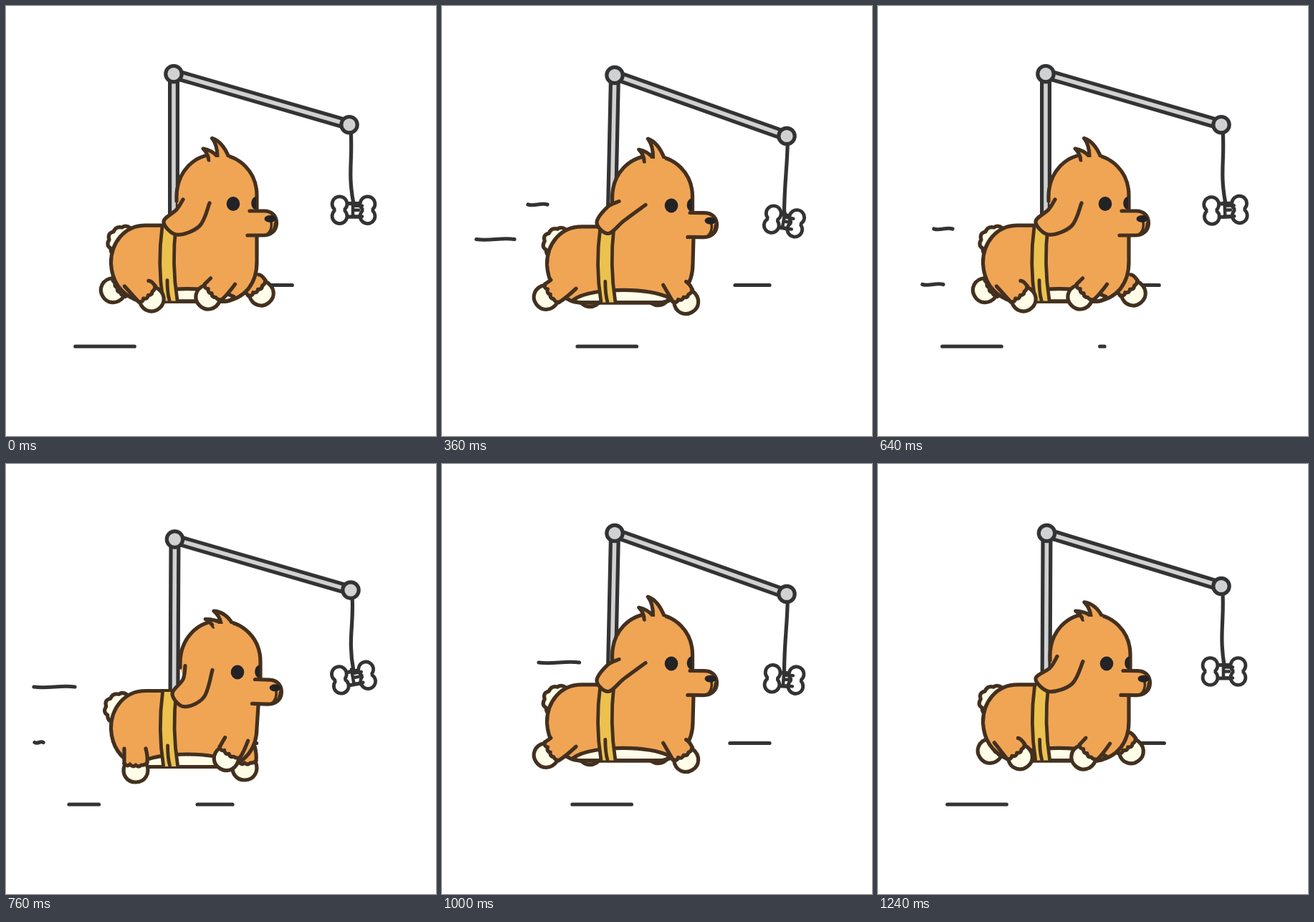
An HTML page for the animation above (1280 ms loop, 600x600 px).

```html
<!DOCTYPE html>
<html lang="en">
<head>
<meta charset="utf-8">
<title>Running puppy</title>
<style>
  html, body { margin: 0; width: 100%; height: 100%; overflow: hidden; background: #fff; }
  svg { display: block; width: 100vw; height: 100vh; }
</style>
</head>
<body>
<svg id="stage" viewBox="0 0 600 600" fill="none" stroke-linecap="round" stroke-linejoin="round"></svg>
<script>
const LOOP = 1280, STEP = 40, STRIDE = 640;
const FUR = '#f0a555', CREAM = '#fffde8', BROWN = '#43301f', DARK = '#333', GREY = '#d0d1d3', BLACK = '#232326';
const stage = document.getElementById('stage');

// Key times within one stride
const KEYS = [0, 120, 200, 360, 520, 600];

// Smooth cyclic interpolation through values at the key times
function at(vals, t, keys = KEYS, period = STRIDE) {
  const n = keys.length;
  t %= period;
  let i = n - 1;
  while (keys[i] > t) i--;
  const time = j => keys[(j + n) % n] + period * Math.floor(j / n);
  const val = j => vals[(j + n) % n];
  const slope = j => (val(j + 1) - val(j - 1)) / (time(j + 1) - time(j - 1));
  const d = time(i + 1) - time(i), u = (t - time(i)) / d, w = 1 - u;
  return val(i) * (1 + 2 * u) * w * w + val(i + 1) * (3 - 2 * u) * u * u
    + d * u * w * (slope(i) * w - slope(i + 1) * u);
}

const path = (d, fill, stroke = BROWN, width = 5.2) =>
  `<path d="${d}" fill="${fill || 'none'}" stroke="${stroke}" stroke-width="${width}"/>`;
const disc = (x, y, r, fill, stroke = 'none') =>
  `<circle cx="${x}" cy="${y}" r="${r}" fill="${fill}" stroke="${stroke}" stroke-width="5.2"/>`;
const oval = (x, y, rx, ry) => `<ellipse cx="${x}" cy="${y}" rx="${rx}" ry="${ry}" fill="${BLACK}"/>`;
const move = (x, y, body, turn = '') => `<g transform="translate(${x} ${y}) ${turn}">${body}</g>`;

// Curve through a list of points
function spline(pts) {
  let d = 'M' + pts[0];
  for (let i = 0; i < pts.length - 1; i++) {
    const a = pts[i - 1] || pts[i], b = pts[i], c = pts[i + 1], e = pts[i + 2] || c;
    d += `C${b[0] + (c[0] - a[0]) / 6} ${b[1] + (c[1] - a[1]) / 6} `
      + `${c[0] - (e[0] - b[0]) / 6} ${c[1] - (e[1] - b[1]) / 6} ${c}`;
  }
  return d;
}

// Paw positions and leg angles at the key times
const LEGS = {
  nearHind: { x: [205, 181, 162, 143, 185, 200], y: [411, 430, 428, 408, 417, 411], a: [-42, 0, 8, 55, -17, -38] },
  nearFront: { x: [280, 306, 328, 342, 300, 285], y: [408, 413, 418, 415, 428, 411], a: [45, 30, -20, -30, 8, 43] },
  farHind: { x: [147, 186, 200, 208, 170, 154], y: [398, 408, 408, 405, 418, 402], a: [60, 0, -20, -30, 10, 55] },
  farFront: { x: [358, 333, 310, 300, 342, 355], y: [403, 427, 424, 403, 415, 403], a: [-40, 0, 20, 30, -15, -38] }
};

function leg(name, t) {
  const k = LEGS[name], a = at(k.a, t);
  const left = -33 + 0.2 * a, right = -33 - 0.2 * a;
  const limb = path(`M-16 -10L-16 ${left}Q0 -44 14 ${right}L16 -12Z`, FUR, 'none');
  const paw = path('M-15 -11C-21 3 -12 14 0 14C12 14 21 3 15 -12', CREAM);
  const cuff = path('M-16 -12q4 5 8 1q4 5 8 1q4 4 8 0q4 1 8 -3', FUR);
  const sides = path(`M-16 -12L-16 ${left}M16 -13Q17 -22 14 ${right}`);
  return move(at(k.x, t), at(k.y, t), limb + paw + cuff + sides, `rotate(${a})`);
}

// Line running left, cut to the span lo..hi
function streak(y, x, len, lo, hi, wave) {
  const a = Math.max(x, lo), b = Math.min(x + len, hi), d = b - a;
  if (d <= 0) return '';
  return path(`M${a} ${y}C${a + d * 0.35} ${y + wave} ${a + d * 0.65} ${y - wave} ${b} ${y}`, '', DARK);
}

function ground(t) {
  const run = 0.355 * (Math.min(t, 1240) % 620);
  let out = '';
  for (const n of [-1, 0, 1]) {
    out += streak(475, 316.8 + 220 * n - run, 82.5, 88, 316, 0);
    out += streak(389.5, 536.8 + 220 * n - run, 82.5, 300, 457, 0);
  }
  return out;
}

// Each gust: height, left end, time there, length, visible span
const GUSTS = [
  [277, 146, 200, 53, 120, 199], [325.5, 100, 200, 53, 22, 104], [388.5, 101, 520, 29, 40, 120],
  [311, 39, 760, 57, 22, 104], [277, 135, 1000, 56.5, 120, 199]
];
const wind = t => GUSTS.map(([y, x, t0, len, lo, hi]) =>
  streak(y, x - 0.325 * (t - t0), len, lo, hi, 3)).join('');

function bone(x, y, w, angle) {
  const lobes = (s, r, ink) => disc(s * w, -8.5, r, ink) + disc(s * w, 8.5, r, ink);
  const knob = s => lobes(s, 12.8, DARK) + lobes(s, 8, '#fff') + path(`M${s * w} -3V3`, '', '#fff', 10);
  const shaft = path(`M${-w} -9H${w}V9.5H${-w}Z`, '#fff', DARK);
  const knot = path('M-1 -12V9M-1 -6H12M-1 0H7M-1 9H12', '', DARK, 4.5);
  return move(x, y, shaft + knob(-1) + knob(1) + knot, `rotate(${angle})`);
}

function rig(t, bob) {
  const x1 = at([234, 235.5, 238, 241, 237, 235.5], t), y1 = 94.7 + bob;
  const x2 = at([479, 481, 482, 481, 479, 479], t);
  const y2 = y1 + at([71, 71, 76, 85, 80, 74], t);
  const bx = at([485, 485, 485, 477.5, 479, 483], t);
  const by = y2 + at([119, 122, 123, 119, 123, 119], t);
  const half = at([19.5, 19, 19, 16.5, 15.5, 19.5], t);
  const tilt = at([0, 0, 10, 8, -10, 4, 0], t, [0, 200, 360, 520, 760, 1000, 1240], LOOP);
  const slack = at([1, 1, 0, 0, 0, 0.8], t);
  const bars = `M${234 + (x1 - 234) * 0.3} ${322 + bob}L${x1} ${y1}L${x2} ${y2}`;
  const cord = `M${x2 + 1.5} ${y2}C${x2 + 1 + 5 * slack} ${y2 + 45} ${bx - 9 * slack} ${y2 + 65} ${bx} ${by - 9}`;
  return {
    x: x1,
    art: path(cord, '', DARK) + bone(bx, by, half, tilt)
      + path(bars, '', DARK, 16) + path(bars, '', GREY, 5.6)
      + disc(x1, y1, 11.2, GREY, DARK) + disc(x2, y2, 11.2, GREY, DARK)
  };
}

function torso(beltX, chest) {
  const outline = `M240 306.5H195C165 306.5 146 331 146.5 360C148 386 160 401 180 410Q186 412.5 195 412.5H306C334 408 350 387 350 358L${chest} 320`;
  const belly = 'M183 409C197 398 230 395 252 395C282 395 305 400 318 406Q314 412.5 306 412.5H192Q186 412 183 409Z';
  const belt = path('M219 308Q212 360 220 412H240Q232 360 238 308Z', '#edc14e', 'none')
    + path('M219 308Q212 360 220 411M238 308Q232 360 240 411M226 383Q226 400 229 411', '', BROWN, 4.8);
  return path(outline + 'V290H250Z', FUR, 'none') + path(belly, CREAM) + path(outline)
    + move(beltX, 0, belt);
}

const TAIL = path('M174 310q-7 -5 -12 -1q-9 -2 -12 6q-9 2 -6 11q-5 8 2 12q0 6 3 8L166 335Z', CREAM);

// Six points along the ear: x and y at the key times
const EAR = [
  [[247, 250, 253, 247, 254, 250], [270, 267, 266, 270, 265, 266]],
  [[238, 247, 247, 231, 242, 240], [284, 286, 283, 278, 277, 282]],
  [[220, 232, 238, 216, 216, 220], [301, 306, 301, 300, 288, 297]],
  [[238, 248, 255, 232, 230, 239], [319, 324, 322, 315, 310, 315]],
  [[270, 276, 273, 254, 265, 271], [307, 311, 312, 297, 301, 304]],
  [[284, 288, 291, 284, 291, 286], [275, 273, 272, 275, 272, 273]]
];

function head(t, sway) {
  const dy = 8.5 * sway;
  const domeX = at([0, 5, 8, -0.5, 8, 2], t), domeY = 7 * sway;
  const eyeX = at([0, 6, 9, 3, 8, 2], t);
  const noseX = at([0, 7, 9, 6, 7.5, 2], t);
  const flat = at([0, 0.7, 1, -0.1, 1, 0.5], t);

  const skull = 'M238 272V266C238 232 262 207 293 207C326 207 350 232 350 264V286';
  const tuft = `M${283 + 2 * flat} 215Q${282 - 3 * flat} ${206 + 3 * flat} ${275 - 2.5 * flat} ${199 + 8 * flat}`
    + `Q287 ${201 + 5 * flat} 295 210Q${295 - 3 * flat} ${194 + 8 * flat} ${287.5 - 3.5 * flat} ${184.5 + 12.5 * flat}`
    + `Q${302 - flat} ${189 + 8 * flat} 311 211`;
  const dome = path(skull + 'V318H252Z', FUR, 'none') + path(skull)
    + path(tuft, FUR) + path('M288 214L309 214', '', FUR, 6);
  const cheek = path('M349 266C340 267 340 284 349 284Z', BLACK, 'none');

  const snout = path('M340 286H360C372 286 377.5 294 377.5 303C377.5 314 369 320 359 320H337', FUR)
    + path('M370 300Q372 313 364 319M375.5 303Q375 312 369 317', '', BROWN, 3.5) + oval(368.5, 297, 8, 5);
  const ear = EAR.map(([x, y]) => [at(x, t), at(y, t) + dy]);
  return move(domeX, domeY, dome) + move(domeX, dy, cheek)
    + move(eyeX, dy, oval(317, 276, 9.3, 10))
    + move(noseX, dy, snout, `rotate(${sway} 340 300)`)
    + path(spline(ear), FUR);
}

function draw(t) {
  // 0 at the top of each bound, 2 at the bottom
  const sway = 1 - Math.cos(t * Math.PI / 160), bob = 6.1 * sway;
  const pole = rig(t, bob);
  const chest = 350 + at([0, 2.5, 3, 1, 3, 0], t);
  stage.innerHTML = ground(t) + wind(t) + pole.art
    + move(-2.5 * sway, 7.2 * sway, TAIL)
    + leg('farHind', t) + leg('farFront', t)
    + move(0, bob - 0.4, torso((pole.x - 234) * 0.4 - 1, chest))
    + leg('nearHind', t) + leg('nearFront', t)
    + head(t, sway);
}

let start = null, shown = -1;
function tick(now) {
  if (start === null) start = now;
  const t = Math.floor((now - start) % LOOP / STEP) * STEP;
  if (t !== shown) draw(shown = t);
  requestAnimationFrame(tick);
}
draw(0);
requestAnimationFrame(tick);
</script>
</body>
</html>
```
